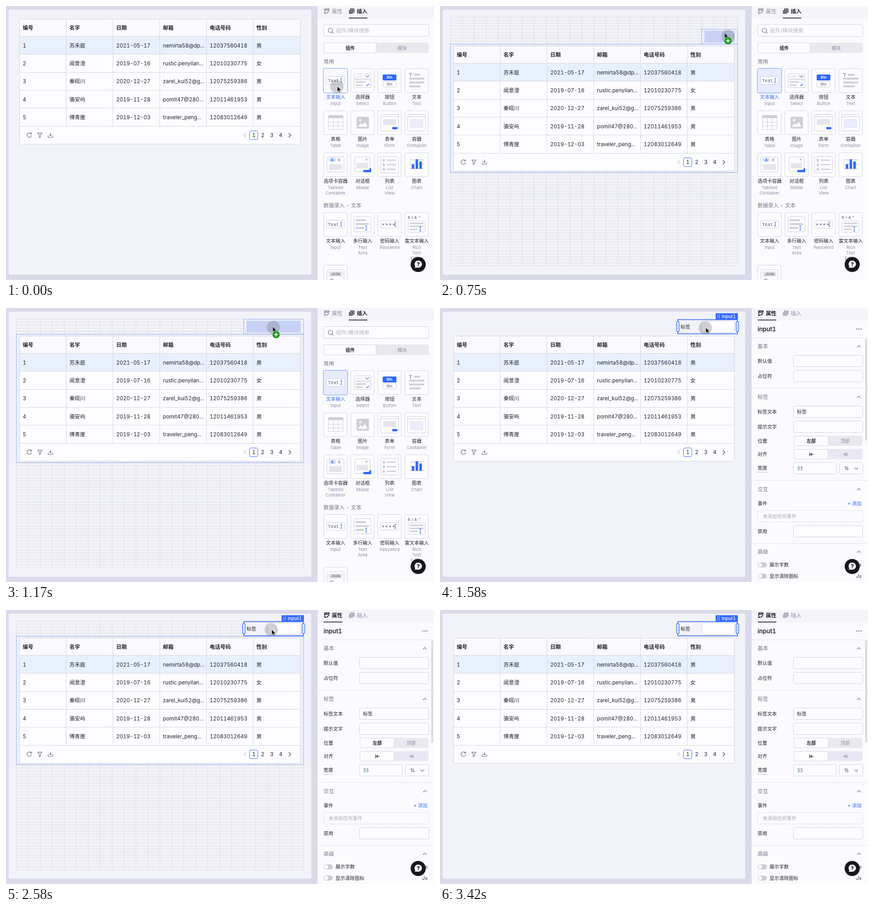
An HTML page that plays this animation: 934 px wide and 600 px high, repeating every 4.66 s.

```html
<!DOCTYPE html>
<html lang="zh">
<head>
<meta charset="utf-8">
<title>Form builder</title>
<style>
html, body { margin: 0; width: 100%; height: 100%; overflow: hidden; background: #dadaea; }
svg { display: block; }
text {
  font-family: Inter, "Noto Sans CJK SC", "Noto Sans CJK", sans-serif;
  font-variant-numeric: tabular-nums;
}
</style>
</head>
<body>
<svg id="stage" width="934" height="600" viewBox="0 0 934 600"></svg>
<script>
const LOOP = 4660, FPS = 12;
const INK = '#1f222b', GREY = '#6f7389', SUB = '#8a8ea3', LINE = '#d3d5e0', BLUE = '#3068ff', BAR = '#cdced6';
const GRID = { x: 22.5, y: 24.5, w: 26.12, h: 6.56, cols: 24, rows: 83 };

// Drawing helpers; every one returns markup
const rect = (x, y, w, h, fill = 'none', stroke = 'none', r = 0, extra = '') =>
  `<rect x="${x}" y="${y}" width="${w}" height="${h}" rx="${r}" fill="${fill}" stroke="${stroke}" ${extra}/>`;
const line = (d, stroke = LINE, w = 1, extra = '') =>
  `<path d="${d}" fill="none" stroke="${stroke}" stroke-width="${w}" ${extra}/>`;
const shape = (d, fill) => `<path d="${d}" fill="${fill}"/>`;
const dot = (x, y, r, fill) => `<circle cx="${x}" cy="${y}" r="${r}" fill="${fill}"/>`;
const text = (x, cy, s, size = 11.5, fill = INK, weight = 400, anchor = 'start', extra = '') =>
  `<text x="${x}" y="${cy + size * 0.37}" font-size="${size}" fill="${fill}" font-weight="${weight}" text-anchor="${anchor}" ${extra}>${s}</text>`;
const mid = (x, cy, s, size, fill, weight) => text(x, cy, s, size, fill, weight, 'middle');
const group = (id, body, x = 0, y = 0) => `<g id="${id}" transform="translate(${x} ${y})">${body}</g>`;
const at = (x, y, body) => `<g transform="translate(${x} ${y})">${body}</g>`;
const chevron = (x, y, up, c = GREY) => line(`M${x - 4} ${y + 2 * up}l4 ${-4 * up}l4 ${4 * up}`, c, 1.1);
const field = (x, y, w, h) => rect(x + .5, y + .5, w - 1, h - 1, '#fdfdff', '#cfd0e0', 3);
const bars = list => list.map(b => rect(...b, BAR)).join('');
const beam = (x, y) => line(`M${x - 2} ${y - 4.5}h4m-2 0v9m-2 0h4`, BLUE, 1.1);
const dashed = (x, y, w, h, fill) => rect(x, y, w, h, fill, '#5b86f2', 0, 'stroke-dasharray="2.5 1.8"');

function gridLines() {
  const { x, y, w, h, cols, rows } = GRID;
  let d = '';
  for (let i = 0; i <= cols; i++) d += `M${x + i * w} ${y}v${rows * h}`;
  for (let i = 0; i <= rows; i++) d += `M${x} ${y + i * h}h${cols * w}`;
  return line(d, '#dcdce1', .9);
}

function table() {
  const xs = [29.5, 131.5, 233.5, 335.5, 437.5, 539.5];
  const rows = [
    ['编号', '名字', '日期', '邮箱', '电话号码', '性别'],
    ['1', '苏禾庭', '2021-05-17', 'nemirta58@dp...', '12037560418', '男'],
    ['2', '闻景澄', '2019-07-16', 'rustic.penyilan...', '12010230775', '女'],
    ['3', '秦砚川', '2020-12-27', 'zarel_kui52@g...', '12075259386', '男'],
    ['4', '骆安屿', '2019-11-28', 'pomit47@280...', '12011461953', '男'],
    ['5', '傅青崖', '2019-12-03', 'traveler_peng...', '12083012649', '男']
  ];
  let s = rect(29.5, 28.5, 613, 274, '#fdfdff', 'none', 3) +
    rect(29.5, 28.5, 613, 38, '#fafafe') + rect(29.5, 66.5, 613, 39, '#e8f0fd');
  rows.forEach((row, i) => {
    s += line(`M29 ${66.5 + Math.round(i * 39.3)}h614`);
    row.forEach((cell, k) => s += text(xs[k] + 7.1, 47.3 + i * 39.25, cell, 11.5, INK, i ? 400 : 600));
  });
  s += xs.slice(1).map(x => line(`M${x} 28.5V263`)).join('') + rect(29.5, 28.5, 613, 274, 'none', LINE, 3);
  s += line('M55 279.6a5 5 0 1 0 1 3.4M55.6 277v3.2h-3.2', GREY, 1.2) +
    line('M69.3 278.3h9.4l-3.3 4.7v4l-2.8 1.4v-5.4z', GREY, 1.2) +
    line('M97 277.5v6.5m-2.6-2.4l2.6 2.6l2.6-2.6M92 283.5v4h10v-4', GREY, 1.2) +
    line('M523.5 278.5l-4.5 4.5l4.5 4.5', '#c3c5cf', 1.2) + line('M617 278.5l4.5 4.5l-4.5 4.5', '#4d5162', 1.3) +
    rect(531.5, 273.5, 18, 19, '#fff', BLUE, 3);
  ['1', '2', '3', '4'].forEach((n, i) => s += mid(540.7 + i * 19.6, 283, n, 11.5, INK));
  return s;
}

const tabs = active => ['属性', '插入'].map((name, i) => {
  const x = 694 + i * 54.5, c = i === active ? INK : SUB;
  const icon = i
    ? line(`M${x + 3.5} 6.5h7.5v7h-7.5zM${x + 1} 9v7h7.5M${x + 7.2} 7.8v4.4m-2.2-2.2h4.4`, c, 1.6)
    : line(`M${x + 11} 9.5V6.5h-9.5v9.5h3.5M${x + 1.5} 9.3h9M${x + 6} 16l5-4.8`, c, 1.8);
  return icon + text(x + 17, 11.7, name, 11.5, c, i === active ? 700 : 500) +
    (i === active ? rect(x - .5, 25.5, 40.5, 1.7, INK) : '');
}).join('');

const segment = (x, y, w, h, left, right) =>
  rect(x, y, w, h, '#e8e8ee', 'none', 3) + rect(x + .5, y + .5, w / 2 - .5, h - 1, '#fdfdff', LINE, 3) + left + right;

const textBox = rect(6.5, 17.5, 39, 17, '#fdfdff', BAR, 1);
const inputIcon = textBox + text(9.5, 26, 'Text', 9.5, '#858995', 700, 'start', 'letter-spacing=".8"') + beam(38.5, 26);
const windowIcon = rect(6.5, 8.5, 39, 36, '#fdfdff', BAR, 2) + line('M7 13.5h38', BAR);

const tiles = [
  ['文本输入', 'Input', inputIcon],
  ['选择器', 'Select', rect(7.5, 11.5, 37, 11, '#fdfdff', BAR, 1) + rect(7.5, 24.5, 37, 17, '#fdfdff', BAR, 1) +
    rect(11, 16, 16, 2.5, '#e5e5eb') + chevron(36.5, 17, -1) + bars([[11, 28, 21, 3], [11, 35, 15, 3]]) + line('M34.5 35.5l2 2l3.8-4', BLUE, 1.4)],
  ['按钮', 'Button', rect(11, 13, 30, 13, BLUE, 'none', 2) + mid(26, 19.5, 'Btn', 7.5, '#fff', 700) +
    rect(11.5, 28.5, 29, 12, '#fdfdff', BAR, 2) + mid(26, 34.5, 'Btn', 7.5, '#858995', 700)],
  ['文本', 'Text', text(9.5, 13.8, 'T', 10, '#858995', 700) + bars([[20, 11.5, 14, 4], [10, 20, 33, 4], [10, 28.5, 33, 4], [10, 37, 25, 4]])],
  ['表格', 'Table', rect(10.5, 10.5, 32, 31, '#fdfdff', BAR, 2) + rect(10.5, 10.5, 32, 6, BAR) +
    line('M21.5 17v24M31.5 17v24M11 25.5h31M11 33.5h31', BAR)],
  ['图片', 'Image', rect(13, 13.5, 27, 26, BAR, 'none', 2) + dot(21, 21, 2.5, '#fff') + shape('M16 35.5l6-8l4 4l5-7l6 11z', '#fff')],
  ['表单', 'Form', windowIcon + rect(12, 18.5, 28, 13, '#e5e5eb') + rect(32, 36, 11, 5, BLUE, 'none', 1)],
  ['容器', 'Container', windowIcon + rect(12.5, 19.5, 27, 18, '#ececfb', '#dddff2')],
  ['选项卡容器', 'Tabbed Container', rect(7.5, 9.5, 37, 33, '#fdfdff', BAR, 2) + rect(11, 11.5, 16, 9, '#d6e1ff', 'none', 4) +
    mid(19, 16, 'A', 7, BLUE, 700) + mid(34, 16, 'B', 7, '#858995', 700) + rect(12, 25, 28, 13, '#e5e5eb')],
  ['对话框', 'Modal', rect(9.5, 9.5, 33, 32, '#fdfdff', BAR, 2) + line('M33 13.5l3.4 3.4m0-3.4l-3.4 3.4', '#70747f') +
    rect(13, 22.5, 25, 12, '#e5e5eb') + shape('M41 34.5h4v8.5h-17v-5h13z', BLUE)],
  ['列表', 'List View', rect(6.5, 8.5, 39, 36, '#fdfdff', BAR, 2) + bars([0, 1, 2].flatMap(i =>
    [[11, 14 + i * 10, 5, 5.5], [20, 15.3 + i * 10, 20, 2.6]]))],
  ['图表', 'Chart', line('M11 16h31M11 25.5h31M11 35h31', BAR, 1.4) +
    rect(15.5, 25.5, 5.5, 10, BLUE) + rect(23.8, 14.5, 5.5, 21, BLUE) + rect(32, 19.5, 5.5, 16, BLUE)],
  ['文本输入', 'Input', inputIcon],
  ['多行输入', 'Text Area', rect(7.5, 9.5, 37, 33, '#fdfdff', BAR, 1) + bars([[11, 15, 22, 4], [11, 23.5, 29, 4], [11, 32, 18, 4]]) + beam(34, 34.5)],
  ['密码输入', 'Password', textBox + text(8.5, 28, '****', 10.5, '#70747f', 700, 'start', 'letter-spacing="1"') + beam(38.5, 26)],
  ['富文本输入', 'Rich Text Editor', text(7, 11.5, 'B <tspan font-style="italic">I</tspan> A ”', 7, '#70747f', 700, 'start', 'letter-spacing="1"') +
    rect(7.5, 18.5, 37, 25, '#fdfdff', BAR, 1) + bars([[11, 22.5, 30, 3], [11, 29, 30, 3], [11, 35.5, 17, 3]]) + beam(34, 36.5)],
  ['', '', rect(7.5, 10.5, 37, 33, '#fdfdff', BAR, 2) + rect(11, 14.5, 30, 11, '#e5e5eb', 'none', 2) +
    mid(26, 20.2, 'JSON', 7.5, '#70747f', 700) + line('M14 33l4-3l3 2l-4 4', '#858995', 1.4)]
];

function insertPanel() {
  const tops = [137, 229, 321, 452, 567];
  let s = tabs(1) + field(693, 40, 230, 27) + `<circle cx="708" cy="53.3" r="4.8" fill="none" stroke="${GREY}" stroke-width="1.2"/>` +
    line('M711.5 57l3 3', GREY, 1.3) + text(720, 54, '组件/模块搜索', 11.5, '#b3b6c1') +
    segment(693, 80, 229.5, 23, mid(751, 91.8, '组件', 10, INK, 600), mid(864.5, 91.8, '模块', 10, SUB, 500)) +
    text(693, 122, '常用', 11.5, GREY, 500) + text(693, 436.5, '数据录入 - 文本', 11.5, GREY, 500);
  tiles.forEach(([name, sub, icon], i) => {
    const x = 693 + i % 4 * 59, y = tops[i >> 2];
    const frame = i ? rect(.5, .5, 51, 52, '#fdfdff', LINE, 3)
      : rect(-.5, -.5, 53, 54, '#f8f8ff', '#7397fa', 3, 'id="picked"');
    s += at(x, y, frame + icon + mid(26.2, 61.8, name, 10.5, i ? INK : BLUE, 500) +
      sub.split(' ').map((word, k) => mid(26.2, 76.6 + k * 11.7, word, 9.5, SUB)).join(''));
  });
  return s;
}

function propertyPanel() {
  let s = tabs(0) + text(693, 46.5, 'input1', 13, INK, 600) +
    [909.5, 914, 918.5].map(x => dot(x, 46, 1.3, GREY)).join('') +
    line('M680 65.5h254M680 175.5h254M680 377.5h254M680 515.5h254', '#e1e2ea') + rect(928, 67, 4, 224, '#d8d9e1', 'none', 2);
  [['基本', 84], ['标签', 195], ['交互', 397], ['高级', 534]].forEach(([name, y]) =>
    s += text(693, y, name, 11.5, GREY, 500) + chevron(914, y, 1));
  [['默认值', 116.5], ['占位符', 149.5], ['标签文本', 227], ['提示文字', 260], ['位置', 291], ['对齐', 320.5], ['宽度', 350.5],
    ['事件', 428], ['禁用', 489]].forEach(([name, y]) => s += text(693, y, name, 10.5, INK, 500));
  s += [103, 136, 214, 247, 476].map(y => field(771, y, 152, 26)).join('') + text(779, 227, '标签', 10.5) +
    segment(772, 280, 150, 22, mid(810, 291, '左部', 10, INK, 600), mid(884, 291, '顶部', 10, SUB, 500)) +
    segment(772, 309, 150, 22, rect(848, 309, 74, 22, '#e8e7f3', 'none', 3) +
      line('M806.5 316.5v8M815.5 320.5h-7m3-3l-3 3l3 3', INK, 1.2), line('M888 316.5v8M879 320.5h7m-3-3l3 3l-3 3', SUB, 1.2)) +
    line('M693 359.5h22', SUB, 1, 'stroke-dasharray="2 1.5"') + field(771, 338, 94, 26) + field(871, 338, 52, 26) +
    text(779, 351.5, '33', 10.5, '#2d6b61', 400, 'start', 'style="font-family:Noto Sans Mono,monospace"') +
    text(882, 351.5, '%', 10.5) + chevron(908.5, 351.5, -1) +
    text(920, 428, '+ 添加', 10.5, BLUE, 500, 'end') +
    rect(693.5, 443.5, 229, 25, 'none', '#cfd0dc', 3, 'stroke-dasharray="3 2"') + text(704, 455.7, '未添加任何事件', 10.5, '#a7aab6');
  [['展示字数', 562.5], ['显示清除图标', 587]].forEach(([name, y]) =>
    s += rect(693.5, y - 5.5, 19.5, 11, '#c9cad3', 'none', 5.5) + dot(699, y, 4.3, '#fff') + text(719, y, name, 10.5, INK, 500) +
      text(908, y, 'Js', 10.5, GREY, 700, 'start', 'font-style="italic"'));
  return s;
}

const handle = x => rect(x, 30, 5.5, 21.5, '#fff', BLUE, 2.7, 'stroke-width="1.3"') +
  [37, 41, 45].map(y => rect(x + 2, y - .7, 1.5, 1.5, BLUE)).join('');
const widget = rect(519, 25.5, 130, 31, '#f2f2f9', BLUE, 0, 'stroke-width="1.6"') + text(525, 41.2, '标签', 10.5) +
  rect(571.5, 28.5, 71, 25, '#fdfdff', LINE, 3) + handle(516.3) + handle(646.3) + rect(601.5, 11.5, 48.5, 13.5, BLUE) +
  [0, 1].flatMap(i => [14.8, 17.8, 20.8].map(y => rect(605.5 + i * 3.3, y, 1.5, 1.5, '#fff'))).join('') +
  text(614.8, 18.2, 'input1', 10, '#fff', 500);

const help = dot(899.5, 566, 16.5, '#17181c') +
  shape('M899.5 557.5a8.3 7.8 0 0 1 0 15.6h-7.5l1.3-3a7.8 7.8 0 0 1 6.2-12.6z', '#fff') + mid(899.7, 565.4, '?', 12, '#17181c', 800);
const arrow = '<path d="M0 0v11.5l2.7-2.4l2 4.3l2-.9l-2-4.2h3.6z" fill="#111" stroke="#fff" stroke-width=".6"/>';

document.getElementById('stage').innerHTML =
  rect(0, 0, 934, 600, '#dadaea') + rect(6, 8, 660, 580.5, '#f2f2f9', 'none', 3) +
  group('grid', gridLines()) +
  group('sheet', group('outline', dashed(22.5, 24.5, 627, 281, '#eef0fb')) + table()) +
  group('ghost', '') + group('widget', widget) +
  rect(680, 0, 254, 600, '#fbfbfe') + rect(680, 0, 254, 27, '#f4f4fa') +
  group('insert', insertPanel()) + group('props', propertyPanel()) + help +
  group('ripple', '<circle r="14.5" fill="#77777c" opacity=".33"/>') +
  group('cursor', arrow + group('plus', dot(0, 0, 8, '#239a1f') + line('M-4 0h8M0-4v8', '#fff', 2), 7.5, 17.3));

const el = id => document.getElementById(id);
const show = (id, on) => el(id).style.display = on ? '' : 'none';
const move = (id, x, y) => el(id).setAttribute('transform', `translate(${x} ${y})`);

// Pointer path: [step, x, y]
const path = [[3, 723, 176], [5, 712, 154], [7, 664, 94], [9, 621, 59], [11, 599, 48], [14, 582, 41], [17, 580, 43],
  [31, 580, 43], [37, 585, 40], [38, 599, 32], [39, 645, 15], [40, 744, 1], [41, 800, -40]];
// Drop slot while dragging: [first step, column, row]
const slots = [[8, 22, 5], [9, 21, 4], [10, 20, 2], [11, 20, 1], [12, 20, 0], [13, 19, 0]];

function pointer(n) {
  const i = path.findIndex(p => p[0] > n);
  if (i < 1) return path[i ? path.length - 1 : 0].slice(1);
  const [a, ax, ay] = path[i - 1], [b, bx, by] = path[i], k = (n - a) / (b - a);
  return [ax + (bx - ax) * k, ay + (by - ay) * k];
}

function draw(ms) {
  const n = Math.floor((ms + 5) * FPS / 1000);
  const dragging = n >= 5 && n < 18, dropped = n >= 18, flash = n >= 31 && n < 35;
  const slot = dragging && slots.filter(s => s[0] <= n).pop();

  show('grid', dragging || flash);
  show('outline', dragging || flash);
  show('ghost', slot);
  show('widget', dropped);
  show('insert', !dropped);
  show('props', dropped);
  show('plus', dragging);
  show('cursor', n < 41);
  show('ripple', n < 41);
  el('picked').setAttribute('fill', dragging ? '#e6ebfd' : '#f8f8ff');

  if (slot) {
    const x = GRID.x + slot[1] * GRID.w, y = GRID.y + slot[2] * GRID.h, w = 649.5 - x;
    el('ghost').innerHTML = dashed(x, y, w, 32.5, '#eef0fb') + rect(x + 6, y + 3.3, w - 12.5, 26, '#c6d1f6');
  }
  const shift = dropped ? 5 : slot ? slot[2] + 5 : 0;
  move('sheet', 0, Math.round(shift * GRID.h));

  const [x, y] = pointer(n), [rx, ry] = pointer(n - .4);
  move('cursor', x, y);
  move('ripple', rx - 1, ry + .5);
}

function tick() {
  draw(performance.now() % LOOP);
  requestAnimationFrame(tick);
}
tick();
</script>
</body>
</html>
```
